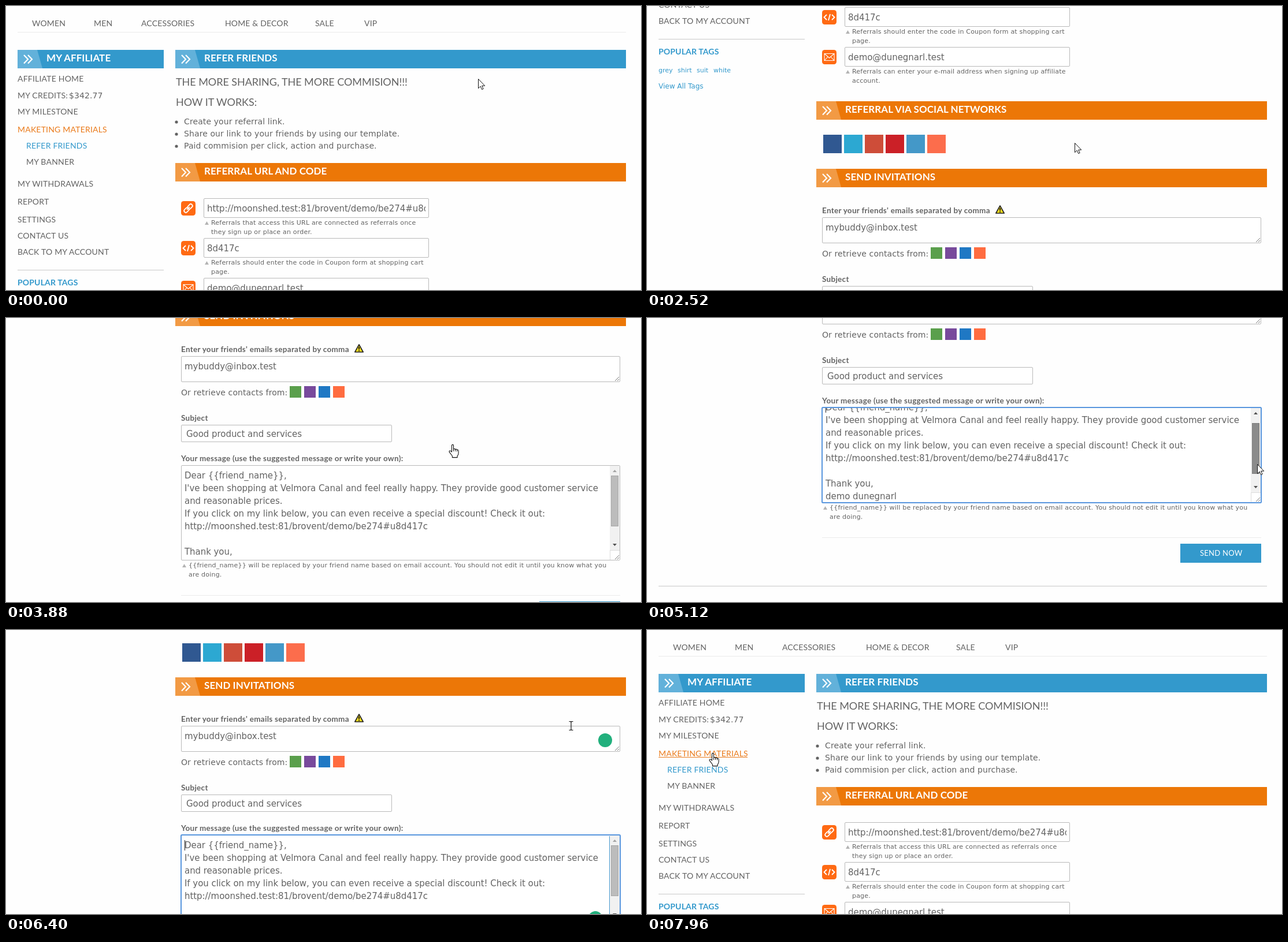
Recreate the animation shown at these times as an HTML page. Size 1099x492 px, loop 8 s.

```html
<!DOCTYPE html>
<html lang="en">
<head>
<meta charset="utf-8">
<title>Refer friends</title>
<style>
html, body { margin: 0; width: 100%; height: 100%; overflow: hidden; background: #fefefe; }
svg { display: block; }
text { fill: #636363; font-family: "DejaVu Sans", Verdana, sans-serif; white-space: pre; }
.nav, .side, .head, .bar, .label, .tags, .btn { font-family: Lato, "Open Sans", sans-serif; }
.nav { font-size: 14px; letter-spacing: .15px; }
.side { font-size: 14px; letter-spacing: .2px; }
.head { font-size: 18px; letter-spacing: -.05px; }
.bar { font-size: 17px; letter-spacing: .06px; font-weight: 700; fill: #fff; }
.tags { font-size: 14px; font-weight: 700; letter-spacing: .15px; }
.label { font-size: 13.5px; font-weight: 700; letter-spacing: .28px; }
.btn { font-size: 13px; letter-spacing: .25px; fill: #fff; }
.body { font-size: 14px; letter-spacing: .1px; }
.field { font-size: 15px; letter-spacing: -.05px; }
.note { font-size: 11px; letter-spacing: .2px; }
.tag { font-size: 11px; }
.all { font-size: 12px; }
.blue { fill: #3399cc; }
.orange { fill: #ea7a1a; }
</style>
</head>
<body>
<svg id="stage" xmlns="http://www.w3.org/2000/svg" width="1099" height="492" viewBox="0 0 1099 492"></svg>
<script>
const LOOP = 8000, STEP = 40;
const BLUE = '#3399cc', ORANGE = '#ec7707', ICON = '#ff6a13';
const LINK = 'http://moonshed.test:81/brovent/demo/be274#u8d417c';
const SIZE = { nav: 14, side: 14, head: 18, bar: 17, tags: 14, label: 13.5, btn: 13, body: 14, field: 15, note: 11, tag: 11, all: 12 };

// Text placed by left edge and the middle of its capitals
const text = (style, x, mid, str, tint = '') =>
  `<text class="${style} ${tint}" x="${x}" y="${Math.round(mid + SIZE[style] * .36)}">${str.replace(/&/g, '&amp;')}</text>`;
const rect = (x, y, w, h, fill, more = '') =>
  `<rect x="${x}" y="${y}" width="${w}" height="${h}" fill="${fill}" ${more}/>`;
const path = (d, stroke, width = 1, fill = 'none', more = '') =>
  `<path d="${d}" stroke="${stroke}" stroke-width="${width}" fill="${fill}" ${more}/>`;
const box = (x, y, w, h, more = '') =>
  rect(x + .5, y + .5, w - 1, h - 1, '#fff', `stroke="#b9b9b9" rx="1.5" ${more}`);
const clip = (x, y, w, h, inner) =>
  `<svg x="${x}" y="${y}" width="${w}" height="${h}" viewBox="${x} ${y} ${w} ${h}">${inner}</svg>`;
const rows = (style, x, mid, gap, list) =>
  list.map((s, i) => text(style, x, mid + i * gap, s)).join('');

const bar = (x, y, w, title, fill, light, tx) =>
  rect(x, y, w, 32, fill) +
  path(`M${x} ${y}h34l9 32h-43z`, 'none', 0, light) +
  path(`M${x + 11} ${y + 9}l7 7.2-7 7.2M${x + 18} ${y + 9}l7 7.2-7 7.2`, '#fff', 2.2) +
  text('bar', tx, y + 14, title);

const note = (x, mid, lines) =>
  path(`M${x - 11} ${mid + 4}l3.5-6 3.5 6z`, 'none', 0, '#b3b3b3') + rows('note', x, mid, 16, lines);

const grip = (x, y) => path(`M${x - 9} ${y - 2}l7-7M${x - 5} ${y - 2}l3-3`, '#777');

const iconMarks = {
  link: y => `<g transform="rotate(-45 315.5 ${y + 12.5})" fill="none" stroke="#fff" stroke-width="1.8">
    <rect x="306.5" y="${y + 9.5}" width="9.5" height="6" rx="3"/><rect x="315" y="${y + 9.5}" width="9.5" height="6" rx="3"/>
    <path d="M312 ${y + 12.5}h7"/></g>`,
  code: y => path(`M311 ${y + 8}l-4.5 4.5 4.5 4.5M320 ${y + 8}l4.5 4.5-4.5 4.5M317 ${y + 7}l-3 11`, '#fff', 1.8),
  mail: y => path(`M307 ${y + 6.5}h17v12h-17zl8.5 7.5 8.5-7.5M307 ${y + 18.5}l6-6.5M324 ${y + 18.5}l-6-6.5`, '#fff', 1.1)
};

const inputRow = (y, icon, value, lines) =>
  rect(303, y + 5, 25, 25, ICON, 'rx="4.5"') + iconMarks[icon](y + 5) +
  box(342, y, 390, 34) + clip(343, y, 383, 34, text('field', 348, y + 18, value)) +
  note(355, y + 42, lines);

function pageMarkup() {
  const nav = [[45, 'WOMEN'], [152, 'MEN'], [234, 'ACCESSORIES'], [379, 'HOME & DECOR'], [535, 'SALE'], [620, 'VIP']];
  const side = [[126, 'AFFILIATE HOME'], [155, 'MY CREDITS:'], [183, 'MY MILESTONE'], [308, 'MY WITHDRAWALS'],
    [339, 'REPORT'], [370, 'SETTINGS'], [398, 'CONTACT US'], [426, 'BACK TO MY ACCOUNT']];
  const steps = ['Create your referral link.', 'Share our link to your friends by using our template.',
    'Paid commision per click, action and purchase.'];
  const share = ['#305891', '#2ca8d2', '#ce4d39', '#cb2027', '#4498c8', '#fc6d4c'];
  const contacts = ['#5a9f4c', '#784a9c', '#1f78c4', '#ff6c40'];
  const message = ['Dear {{friend_name}},',
    "I've been shopping at Velmora Canal and feel really happy. They provide good customer service",
    'and reasonable prices.',
    'If you click on my link below, you can even receive a special discount! Check it out:',
    LINK, '', 'Thank you,', 'demo dunegnarl'];
  const orangeBar = (y, title) => bar(293, y, 780, title, ORANGE, '#f29a44', 343);

  return [
    nav.map(([x, s]) => text('nav', x, 30, s)).join(''),
    rect(20, 45, 1053, 1, '#ebebeb'),

    bar(20, 76, 253, 'MY AFFILIATE', BLUE, '#62b1da', 70),
    side.map(([y, s]) => text('side', 20, y, s)).join(''),
    text('body', 109, 155, '$342.77'),
    text('side', 20, 214, 'MAKETING MATERIALS', 'orange'),
    rect(20, 220, 154, 1, '#ea7a1a', 'id="underline"'),
    text('side', 35, 242, 'REFER FRIENDS', 'blue'),
    text('side', 35, 270, 'MY BANNER'),
    rect(20, 457, 253, 1, '#c8c8c8'),
    text('tags', 20, 479, 'POPULAR TAGS', 'blue'),
    [[20, 'grey'], [53, 'shirt'], [86, 'suit'], [115, 'white']].map(([x, s]) => text('tag', x, 511, s, 'blue')).join(''),
    text('all', 20, 539, 'View All Tags', 'blue'),

    bar(293, 76, 780, 'REFER FRIENDS', BLUE, '#62b1da', 343),
    text('head', 294, 132, 'THE MORE SHARING, THE MORE COMMISION!!!'),
    text('head', 294, 167, 'HOW IT WORKS:'),
    rows('body', 308, 200, 21, steps),
    steps.map((s, i) => `<circle cx="295" cy="${201 + i * 21}" r="2.6" fill="#636363"/>`).join(''),

    orangeBar(272, 'REFERRAL URL AND CODE'),
    inputRow(333, 'link', LINK, ['Referrals that access this URL are connected as referrals once', 'they sign up or place an order.']),
    inputRow(402, 'code', '8d417c', ['Referrals should enter the code in Coupon form at shopping cart', 'page.']),
    inputRow(471, 'mail', 'demo@dunegnarl.test', ['Referrals can enter your e-mail address when signing up affiliate', 'account.']),

    orangeBar(565, 'REFERRAL VIA SOCIAL NETWORKS'),
    share.map((c, i) => rect(305 + i * 36, 623, 32, 32, c)).join(''),

    orangeBar(682, 'SEND INVITATIONS'),
    text('label', 303, 754, "Enter your friends' emails separated by comma"),
    path('M611 746l7.2 13h-14.4z', '#222', 1.6, '#f5dc1e', 'stroke-linejoin="round"'),
    path('M611 750v4.5M611 755.8v1.6', '#111', 1.8),
    box(303, 766, 760, 45), grip(1063, 811),
    text('field', 309, 784, 'mybuddy@inbox.test'),
    '<circle id="dotA" cx="1037" cy="791" r="12" fill="#22b07d"/>',
    text('body', 303, 829, 'Or retrieve contacts from:'),
    contacts.map((c, i) => rect(491 + i * 25, 818, 20, 20, c)).join(''),

    text('label', 303, 873, 'Subject'),
    box(303, 885, 365, 30), text('field', 312, 901, 'Good product and services'),
    text('label', 303, 943, 'Your message (use the suggested message or write your own):'),
    box(303, 955, 760, 165),
    clip(304, 956, 741, 163, `<g id="letter">${rows('field', 309, 973, 22, message)}${rect(309, 964, 1, 18, '#222', 'id="caret"')}</g>`),
    '<circle id="dotB" cx="1020" cy="1099" r="12" fill="#22b07d"/>',
    rect(1045, 956, 17, 163, '#f1f1f1'),
    rect(1047.5, 973.5, 12, 87, '#bcbcbc', 'id="thumb" stroke="#a6a6a6"'),
    path('M1050 967l3.5-4 3.5 4z', 'none', 0, '#a3a3a3', 'id="up"'),
    path('M1050 1091l3.5 4 3.5-4z', 'none', 0, '#505050'),
    rect(1045, 1102, 17, 17, '#fff'), path('M1045 1102.5h17M1045.5 1102v17', '#dcdcdc'), grip(1063, 1120),
    rect(303, 955, 760, 165, 'none', 'id="focus" stroke="#5896de" stroke-width="2" rx="1.5"'),
    rect(1044, 957, 1, 162, '#4a9bd0', 'id="edge"'),
    note(316, 1128, ['{{friend_name}} will be replaced by your friend name based on email account. You should not edit it until you know what you', 'are doing.']),
    rect(303, 1180, 760, 1, '#ebebeb'),
    rect(923, 1191, 140, 33, BLUE), text('btn', 957, 1207.5, 'SEND NOW'),
    rect(20, 1264, 1053, 1, '#c8c8c8')
  ].join('');
}

const cursors = {
  arrow: path('M.5.5v16.2l3.7-3.6 2.4 5.5 2.5-1.1-2.4-5.3h5z', '#111', 1, '#fff'),
  hand: path('M-1.5 13V2q0-1.6 1.5-1.6T1.5 2v6q2.6-1 3 .6 2.6-.8 3 .8 2.6-.4 2.6 1.6v4q0 3-2 5v2.6H-.6V20L-5.6 13.4q-.9-1.6.6-2.3 1-.4 2 .6z', '#111', 1.1, '#fff', 'stroke-linejoin="round"') +
    path('M1.5 8v4M4.5 9v3M7.5 10v2.4', '#111'),
  beam: path('M-3.5-7.5h2.5l1 1 1-1h2.5M0-6.5v13M-3.5 7.5h2.5l1-1 1 1h2.5', '#111', 1.2)
};

// time, page offset
const scrolls = [[0, 0], [600, 100], [720, 200], [1240, 300], [2120, 400], [3160, 500], [3320, 600], [3520, 700],
  [4000, 800], [6240, 700], [6360, 600], [6480, 500], [6600, 400], [6720, 300], [6800, 200], [6920, 100], [7000, 0]];

// time, x, y, pointer shape
const moves = [
  [0, 817, 126], [40, 828, 136], [200, 828, 136], [360, 729, 103], [480, 729, 103], [800, 734, 118], [1040, 734, 118],
  [1080, 736, 120], [1160, 736, 120], [1400, 703, 201], [1560, 703, 201], [1680, 715, 215], [1880, 715, 215],
  [2520, 740, 237], [3000, 740, 237], [3680, 773, 219, 'hand'], [3920, 773, 219, 'hand'], [3960, 830, 223],
  [4160, 1072, 240], [4280, 1072, 240], [4480, 1056, 244], [4600, 1056, 244], [5120, 1056, 253], [5480, 1058, 268],
  [5880, 1058, 244], [5960, 1060, 244], [6080, 1030, 216, 'beam'], [6240, 985, 170], [6360, 978, 166, 'beam'],
  [6440, 978, 166, 'beam'], [6480, 977, 166], [6800, 970, 170], [7040, 963, 173], [7200, 963, 173], [7440, 760, 192],
  [7640, 420, 208], [7760, 240, 205], [7880, 150, 230], [7960, 114, 213, 'hand']];

const stage = document.getElementById('stage');
stage.innerHTML = `<g id="page">${pageMarkup()}</g><g id="pointer">` +
  Object.keys(cursors).map(k => `<g id="${k}">${cursors[k]}</g>`).join('') + '</g>';
const el = id => document.getElementById(id);
const show = (id, on) => el(id).setAttribute('visibility', on ? 'visible' : 'hidden');
const shift = (id, x, y) => el(id).setAttribute('transform', `translate(${x} ${y})`);
const lastKey = (list, t) => list.reduce((found, k, i) => k[0] <= t ? i : found, 0);

function pointerAt(t) {
  const i = lastKey(moves, t), a = moves[i], b = moves[i + 1] || a;
  const p = b === a ? 0 : (t - a[0]) / (b[0] - a[0]);
  return { x: Math.round(a[1] + (b[1] - a[1]) * p), y: Math.round(a[2] + (b[2] - a[2]) * p), shape: a[3] || 'arrow' };
}

function draw(t) {
  const ptr = pointerAt(t);
  shift('page', 0, -scrolls[lastKey(scrolls, t)][1]);
  shift('pointer', ptr.x, ptr.y);
  for (const k in cursors) show(k, k === ptr.shape);

  const dragging = t >= 4600 && t < 5880;
  const drag = dragging ? ptr.y - 244 : 0;
  shift('thumb', 0, drag);
  shift('letter', 0, -2 * drag);
  el('thumb').setAttribute('fill', dragging ? '#8b8b8b' : '#bcbcbc');
  el('thumb').setAttribute('stroke', dragging ? '#7c7c7c' : '#a6a6a6');
  el('up').setAttribute('fill', drag ? '#505050' : '#a3a3a3');

  const focused = t >= 4480;
  show('focus', focused);
  show('caret', focused && t % 1000 < 500);
  show('edge', t >= 6000);
  show('dotB', t >= 6000);
  show('dotA', t >= 6360);
  show('underline', t >= 7920);
}

const start = performance.now();
function tick() {
  const t = (performance.now() - start) % LOOP;
  draw(Math.floor(t / STEP) * STEP);
  requestAnimationFrame(tick);
}
tick();
</script>
</body>
</html>
```
